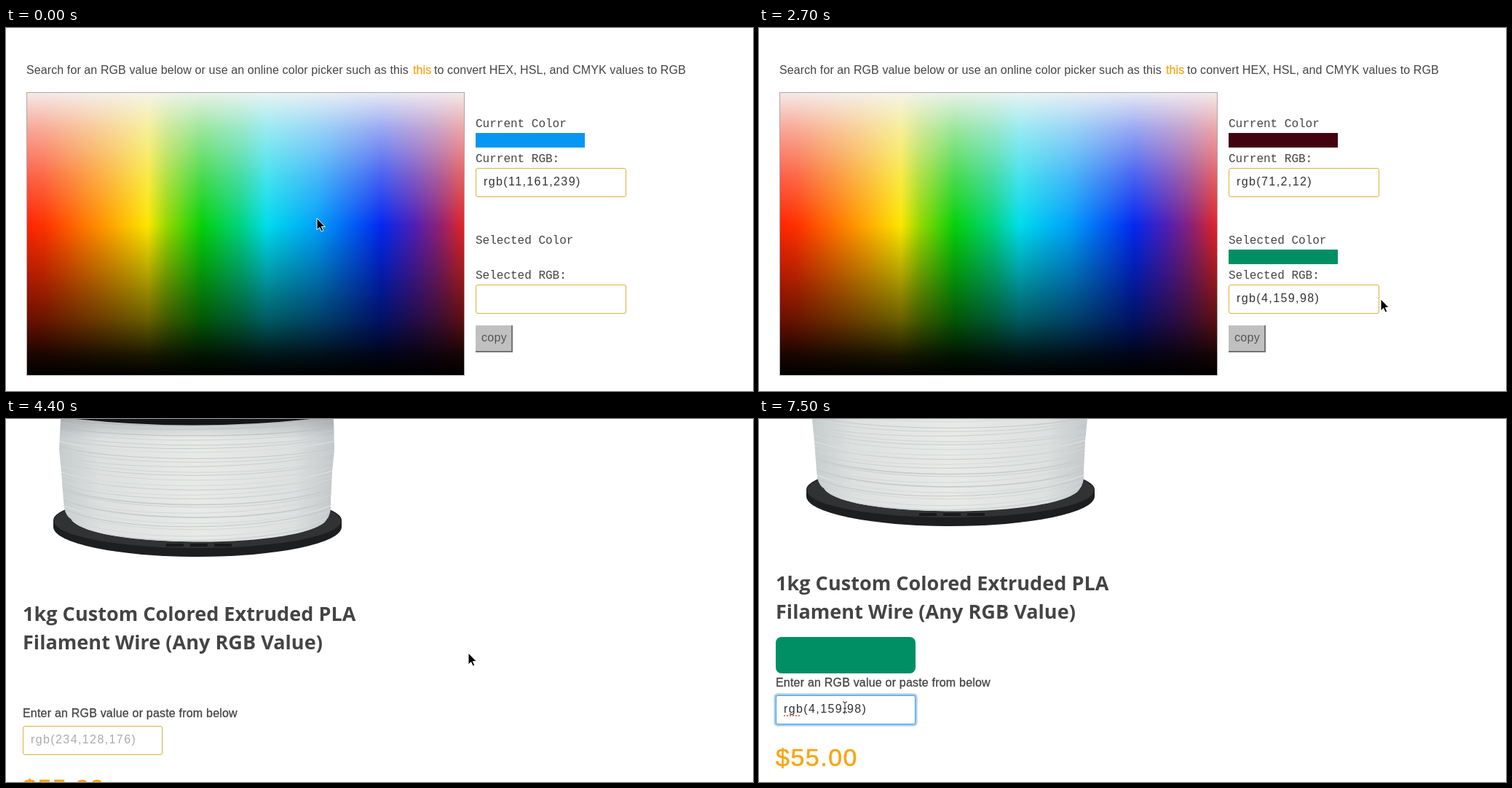
Animation, 1026 px wide and 498 px high, one loop 7600 ms. Source, as an HTML page:

```html
<!DOCTYPE html>
<html lang="en">
<head>
<meta charset="utf-8">
<title>Color picker</title>
<style>
html, body { margin: 0; width: 100%; height: 100%; overflow: hidden; background: #fff; }
svg { display: block; width: 100vw; height: 100vh; }
text { font: 16px "Liberation Sans", Arial, sans-serif; fill: #444; letter-spacing: .1px; white-space: pre; }
.mono { font-family: "Liberation Mono", monospace; letter-spacing: 0; }
.link { fill: #f5a61c; stroke: #f5a61c; stroke-width: .3; }
.value { letter-spacing: 1.4px; fill: #333; }
.hint { fill: #aaa; }
.title { font: 700 27px "Open Sans", sans-serif; letter-spacing: .05px; }
.label { letter-spacing: .2px; stroke: #444; stroke-width: .3; }
.price { font-size: 34px; letter-spacing: 1.5px; fill: #f9a515; stroke: #f9a515; stroke-width: .6; }
.copy { fill: #555; letter-spacing: .3px; }
.field { fill: #fff; stroke: #dbb13c; }
</style>
</head>
<body>
<svg viewBox="0 0 1026 498">
  <defs>
    <linearGradient id="hue">
      <stop offset="0" stop-color="#ff2404"/>
      <stop offset=".04" stop-color="#ff3200"/>
      <stop offset=".12" stop-color="#ff6e00"/>
      <stop offset=".2" stop-color="#ffaa00"/>
      <stop offset=".277" stop-color="#fce600"/>
      <stop offset=".32" stop-color="#96d800"/>
      <stop offset=".4" stop-color="#05d00a"/>
      <stop offset=".49" stop-color="#00d384"/>
      <stop offset=".548" stop-color="#00dcec"/>
      <stop offset=".663" stop-color="#00a0fa"/>
      <stop offset=".81" stop-color="#0228f0"/>
      <stop offset=".885" stop-color="#501eb4"/>
      <stop offset=".94" stop-color="#8c2078"/>
      <stop offset="1" stop-color="#e32424"/>
    </linearGradient>
    <linearGradient id="tint" x2="0" y2="1">
      <stop offset="0" stop-color="#f4f4f4" stop-opacity=".95"/>
      <stop offset=".13" stop-color="#f4f4f4" stop-opacity=".62"/>
      <stop offset=".3" stop-color="#f4f4f4" stop-opacity=".28"/>
      <stop offset=".47" stop-color="#f4f4f4" stop-opacity="0"/>
      <stop offset=".47" stop-color="#000" stop-opacity="0"/>
      <stop offset=".63" stop-color="#000" stop-opacity=".27"/>
      <stop offset=".8" stop-color="#000" stop-opacity=".58"/>
      <stop offset=".93" stop-color="#000" stop-opacity=".9"/>
      <stop offset="1" stop-color="#000"/>
    </linearGradient>
    <linearGradient id="spool">
      <stop offset="0" stop-color="#c6cbcd"/>
      <stop offset=".15" stop-color="#dde0df"/>
      <stop offset=".5" stop-color="#e7eae7"/>
      <stop offset=".85" stop-color="#dde0df"/>
      <stop offset="1" stop-color="#c2c7ca"/>
    </linearGradient>
    <linearGradient id="shade" gradientUnits="userSpaceOnUse" x1="0" x2="0" y1="-45" y2="-15">
      <stop offset="0" stop-color="#777b80" stop-opacity=".4"/>
      <stop offset="1" stop-color="#777b80" stop-opacity="0"/>
    </linearGradient>
    <path id="body" d="M80 -60L75 -40L73 0L76 30L79 70Q80 90 89 95C112 137 420 137 441 95Q447 88 446 70L448 30L451 0L450 -40L446 -60Z"/>
    <clipPath id="inside"><use href="#body"/></clipPath>
  </defs>

  <g id="product">
    <path d="M65 97A198 37 0 0 1 461 97V106A198 41 0 0 1 65 106Z" fill="#1d1e20"/>
    <ellipse cx="263" cy="98" rx="197" ry="37" fill="#303234"/>
    <path d="M220 131H310" stroke="#18191b" stroke-width="4" stroke-dasharray="24 9"/>
    <use href="#body" fill="url(#spool)"/>
    <g id="strands" clip-path="url(#inside)" fill="none"></g>
    <use href="#body" fill="url(#shade)"/>
    <path d="M61 -80H454V-53Q454 -48 445 -45Q257 -22 70 -45Q61 -48 61 -53Z" fill="#151618"/>
    <path d="M66 -56Q257 -33 449 -56" fill="none" stroke="#4a4c4f" stroke-width="1.5"/>
    <g fill="none" stroke="#b9bcbf" stroke-width="3" stroke-linecap="round">
      <path d="M105 -58Q130 -54 165 -55M350 -55Q385 -54 410 -58"/>
      <path d="M195 -54L225 -57M290 -57L320 -54"/>
    </g>
    <text class="title" x="23" y="235">1kg Custom Colored Extruded PLA</text>
    <text class="title" x="23" y="274">Filament Wire (Any RGB Value)</text>
    <rect id="chosen" x="23" y="299" width="192" height="50" rx="8" fill="#008f64"/>
    <text class="label" x="23" y="367">Enter an RGB value or paste from below</text>
    <rect id="glow" x="22.5" y="378.5" width="193" height="41" rx="3" fill="none" stroke="#a5cdf2" stroke-width="4"/>
    <rect id="entry" class="field" x="23.5" y="379.5" width="191" height="39" rx="2.5"/>
    <text id="entryText" class="value" x="34" y="403"></text>
    <path id="spelling" d="M35 407H57" stroke="#e8452c" stroke-width="2" stroke-linecap="round" stroke-dasharray="0 4"/>
    <text class="price" x="23" y="476">$55.00</text>
  </g>

  <g id="picker">
    <text x="28" y="-49">Select an RGB value to custom color extruded filament wire.</text>
    <text x="28" y="-21">Weight:  1kg</text>
    <text x="28" y="63">Search for an RGB value below or use an online color picker such as this</text>
    <text class="link" x="559" y="63">this</text>
    <text x="588" y="63">to convert HEX, HSL, and CMYK values to RGB</text>
    <rect x="28.5" y="88.5" width="601" height="388" fill="url(#hue)"/>
    <rect x="28.5" y="88.5" width="601" height="388" fill="url(#tint)" stroke="#aaa"/>

    <text class="mono" x="645" y="136">Current Color</text>
    <rect id="currentSwatch" x="645" y="144" width="150" height="20"/>
    <text class="mono" x="645" y="184">Current RGB:</text>
    <rect class="field" x="645.5" y="192.5" width="206" height="39" rx="2.5"/>
    <text id="currentText" class="value" x="656" y="216"></text>

    <text class="mono" x="645" y="296">Selected Color</text>
    <rect id="selectedSwatch" x="645" y="304" width="150" height="20"/>
    <text class="mono" x="645" y="344">Selected RGB:</text>
    <rect class="field" x="645.5" y="352.5" width="206" height="39" rx="2.5"/>
    <text id="selectedText" class="value" x="656" y="376"></text>

    <rect x="645" y="408" width="51" height="37" fill="#c0c0c0"/>
    <path d="M695 408V444H645" fill="none" stroke="#747474" stroke-width="2"/>
    <text class="copy" x="653" y="430">copy</text>
  </g>

  <g id="cursor" stroke-linejoin="round">
    <path id="arrow" d="M0 0V16L3.7 12.6L6.2 18L8.8 17L6.4 11.6H11.3Z" fill="#000" stroke="#fff"/>
    <path id="hand" d="M-1 6L-2.5 1Q-1 -2 1 0L3 5Q5 3.5 6 5.5Q8 4.5 8.5 6.5Q10.5 6 10 9L8.5 16H0L-5 9.5Q-4.5 7 -1.5 9.5Z" fill="#fff" stroke="#000" stroke-width="1.3"/>
    <path id="beam" d="M-3 -7Q0 -7 0 -5Q0 -7 3 -7M0 -5V6M-3 8Q0 8 0 6Q0 8 3 8M-2 2H2" fill="none" stroke="#222"/>
  </g>
</svg>
<script>
const LOOP = 7600, STEP = 100, PRODUCT_SCROLL = 858;
const $ = id => document.getElementById(id);

// Each key is [time, ...values].
const pointer = [
  [0, 427, 261], [200, 427, 261], [800, 481, 332], [900, 462, 334],
  [1300, 312, 320], [1500, 312, 320], [1900, 579, 395], [2000, 628, 404],
  [2200, 668, 424], [2500, 668, 424], [2700, 854, 372], [3000, 720, 345],
  [3200, 635, 321], [4700, 635, 321], [4800, 567, 328], [5000, 330, 350],
  [5200, 150, 368], [5300, 121, 371], [5500, 118, 395]
];
const scroll = [
  [3200, 0], [3300, 68], [3400, 200], [3600, 560], [3800, 850], [3900, 917],
  [4300, 917], [4400, 900], [4600, 864], [4700, 858]
];
const hover = [
  [200, 11, 161, 239], [800, 2, 52, 182], [1300, 4, 159, 98],
  [1500, 4, 159, 98], [1900, 19, 4, 86], [2000, 71, 2, 12]
];

function at(keys, t) {
  const next = keys.findIndex(k => k[0] > t);
  if (next === 0) return keys[0].slice(1);
  if (next < 0) return keys[keys.length - 1].slice(1);
  const a = keys[next - 1], b = keys[next];
  const p = (t - a[0]) / (b[0] - a[0]);
  return a.slice(1).map((v, i) => v + (b[i + 1] - v) * p);
}

const show = (id, on) => $(id).setAttribute('visibility', on ? 'visible' : 'hidden');
const move = (id, x, y) => $(id).setAttribute('transform', `translate(${x} ${y})`);

// Swatches show slightly less red and green than the sampled value.
const shade = ([r, g, b]) => `rgb(${Math.max(0, r - 4)},${g * .94},${b + 3})`;

function windStrands() {
  let seed = 7, paths = '';
  const random = () => (seed = seed * 16807 % 2147483647) / 2147483647;
  for (let y = -64; y < 92; y += 5.5) {
    const sag = 12 + (y + 64) * .2;
    const left = y + random() * 5, right = y + random() * 5;
    const tone = 196 + Math.round(random() * 24);
    paths += `<path d="M70 ${left}C140 ${left + sag} 380 ${right + sag} 456 ${right}" ` +
      `stroke="rgb(${tone},${tone + 4},${tone + 4})" stroke-width="${.8 + random()}"/>`;
  }
  $('strands').innerHTML = paths;
}

function draw(t) {
  const [offset] = at(scroll, t);
  move('picker', 0, offset);
  move('product', 0, offset - PRODUCT_SCROLL);

  const current = at(hover, t).map(Math.round);
  $('currentText').textContent = `rgb(${current})`;
  $('currentSwatch').setAttribute('fill', shade(current));

  const selected = t < 200 ? null : t < 1400 ? [11, 161, 239] : [4, 159, 98];
  $('selectedText').textContent = selected ? `rgb(${selected})` : '';
  $('selectedSwatch').setAttribute('fill', t < 1400 ? '#0098f7' : '#008f64');
  show('selectedSwatch', selected);

  const focused = t >= 5700, pasted = t >= 6300;
  show('glow', focused);
  $('entry').style.stroke = focused ? '#4a9be0' : '';
  $('entryText').textContent = pasted ? 'rgb(4,159,98)' : 'rgb(234,128,176)';
  $('entryText').setAttribute('class', pasted ? 'value' : 'value hint');
  show('spelling', pasted);
  show('chosen', pasted);

  const [x, y] = at(pointer, t);
  move('cursor', x, y);
  show('arrow', t < 5300);
  show('hand', t >= 5300 && t < 5400);
  show('beam', t >= 5400);
}

function tick() {
  draw(Math.floor(performance.now() % LOOP / STEP) * STEP);
  requestAnimationFrame(tick);
}

windStrands();
tick();
</script>
</body>
</html>
```
